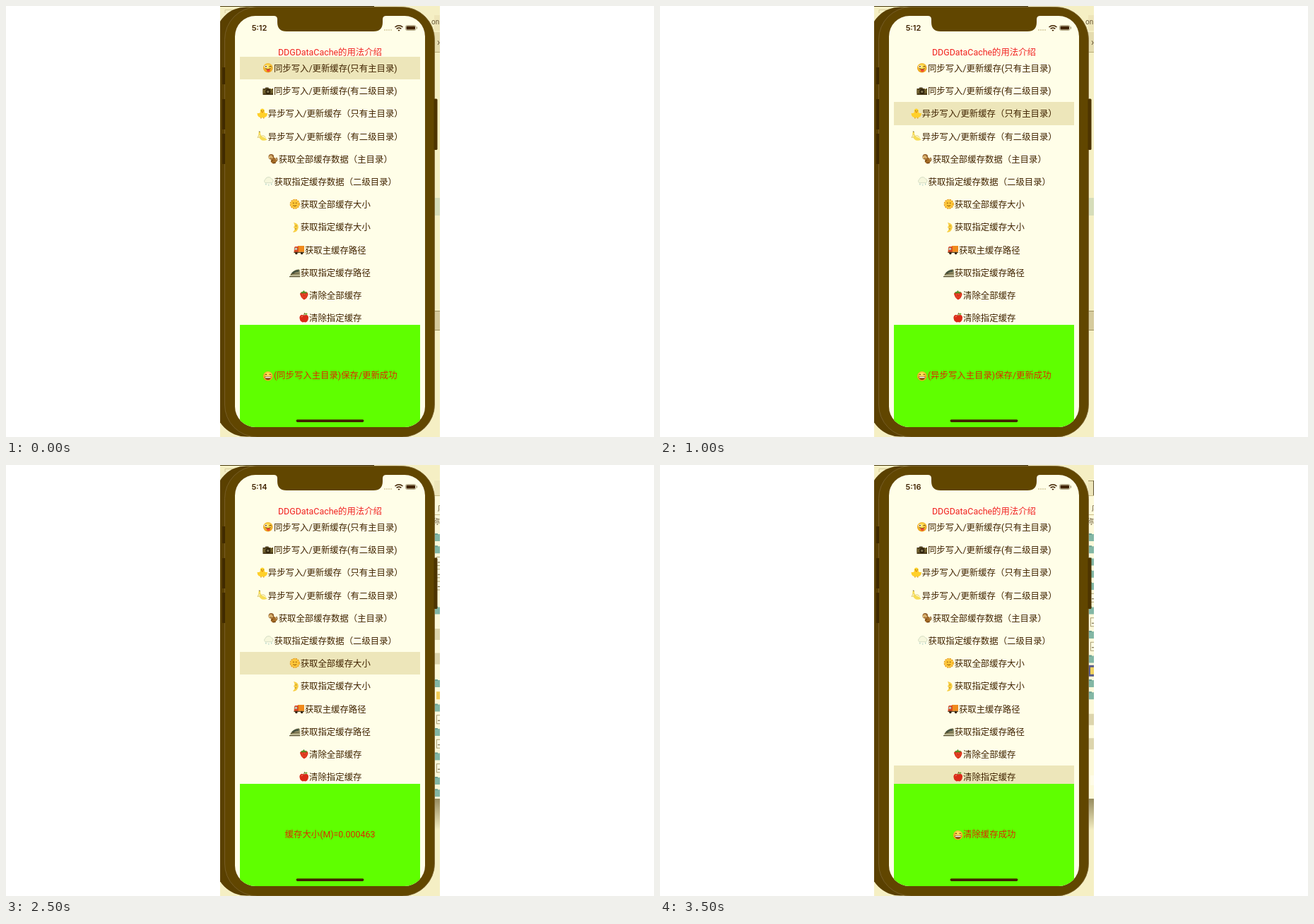
An HTML page for the animation above (4000 ms loop, 917 by 611 pixels).

```html
<!DOCTYPE html>
<html lang="zh-CN">
<head>
<meta charset="utf-8">
<style>
  html, body { margin: 0; width: 917px; height: 611px; overflow: hidden; background: #fff; }
  body { position: relative; font: 12.4px Roboto, "Noto Sans CJK SC", "Noto Sans CJK", sans-serif; color: #412400; }
  #device { position: absolute; left: 0; top: 0; }
  #screen { position: absolute; left: 324px; top: 14px; width: 269px; height: 583px;
    border-radius: 29px; overflow: hidden; background: #fffee8; }
  #screen > * { position: absolute; }
  #clock { left: 18px; top: 10px; width: 33px; text-align: center; font: 600 11px/15px Inter, sans-serif; }
  #title { left: 7px; width: 255px; top: 44px; line-height: 16px; text-align: center; color: #f12321; }
  #list { left: 7px; top: 58px; width: 255px; }
  .row, #panel { display: flex; align-items: center; justify-content: center; white-space: nowrap; }
  .row { height: 32.2px; }
  .row.on { background: #ede6ba; }
  #panel { left: 7px; top: 438px; width: 255px; height: 145px; background: #5fff00; color: #d92b00;
    line-height: 14.5px; text-align: center; }
  .path { letter-spacing: -.1px; }
  .icon { width: 15.5px; height: 15.5px; flex: none; }
</style>
</head>
<body>
<svg id="device" width="917" height="611">
  <defs>
    <radialGradient id="skin" cy=".4"><stop offset=".3" stop-color="#ffe45c"/><stop offset="1" stop-color="#eda51c"/></radialGradient>
    <linearGradient id="shade" x2="0" y2="1"><stop stop-color="#968b5f"/><stop offset="1" stop-color="#f5efc4"/></linearGradient>
    <clipPath id="strip"><path d="M303 0H614V611H303Z"/></clipPath>
    <g id="face"><circle cx="8" cy="8" r="7" fill="url(#skin)"/></g>
    <g id="grin"><path d="M3 8.5h10q-1 5-5 5t-5-5z" fill="#83400c"/><path d="M4 9h8v1.6H4z" fill="#fff"/></g>
    <symbol id="wink" viewBox="0 0 16 16"><use href="#face"/><circle cx="5" cy="6" r="2" fill="#fff"/><circle cx="5" cy="6" r="1" fill="#512b00"/><path d="M9.5 6.5q2-2 3.5 0M4 9q4 2 8 0" fill="none" stroke="#663500"/><path d="M6 10h5v2.5q-2.5 3-5 0z" fill="#ee4a35"/></symbol>
    <symbol id="smile" viewBox="0 0 16 16"><use href="#face"/><path d="M3.5 6.5q1.5-3 3 0M9.5 6.5q1.5-3 3 0" fill="none" stroke="#663500"/><use href="#grin"/></symbol>
    <symbol id="laugh" viewBox="0 0 16 16"><use href="#face"/><path d="M3 4l3 1.5L3 7M13 4l-3 1.5L13 7" fill="none" stroke="#663500"/><use href="#grin"/></symbol>
    <symbol id="camera" viewBox="0 0 16 16"><path d="M.5 4h3l1-1.5h4l1 1.500h6v9.500H.5z" fill="#4b3c1b"/><path d="M.5 6h15v5H.5z" fill="#70602e"/><circle cx="8" cy="8.8" r="3.700" fill="#2e210b"/><circle cx="8" cy="8.8" r="1.800" fill="#7c7250"/><path d="M12 4.700h2" stroke="#f7e9a0"/></symbol>
    <symbol id="chick" viewBox="0 0 16 16"><path d="M6 13v2M10 13v2" stroke="#db8d14" stroke-width="1.4"/><path d="M.5 7q3 1 4.500-1-1-5 3-5.500 4 .5 3 5.500 1.500 2 4.500 1 0 7-7.500 7T.5 7z" fill="#ffd02a"/><path d="M6.500 5h3L8 7z" fill="#e27a10"/><path d="M6.300 3.800h.8M9 3.800h.8" stroke="#412400"/></symbol>
    <symbol id="banana" viewBox="0 0 16 16"><path d="M3 1l2 1q0 5 4 7 4 1 6 4-6 3-10-1-4-4-2-11z" fill="#f6dc55"/><path d="M5 5Q2 6 1 10l3-1M6 8q4-3 7 2" fill="#fff5b5" stroke="#cab25a" stroke-width=".6"/><path d="M3 1l1.700.5" stroke="#634500"/></symbol>
    <symbol id="monkey" viewBox="0 0 16 16"><path d="M11 12q5-1 2-6" fill="none" stroke="#855419" stroke-width="1.4"/><ellipse cx="9" cy="10.500" rx="4" ry="4.500" fill="#a66d28"/><circle cx="5.500" cy="5" r="4" fill="#93602a"/><ellipse cx="5" cy="5.500" rx="2.800" ry="2.600" fill="#f1ca82"/><path d="M3.700 4.500h.8M6 4.500h.8M4 7h2M8 10l-3 2M8 14h4" stroke="#593000"/></symbol>
    <symbol id="snow" viewBox="0 0 16 16"><path d="M3 10a3 3 0 010-5 5 5 0 019-1 3.400 3.400 0 011 6z" fill="#f6f7dc" stroke="#c2cfb5" stroke-width=".7"/><path d="M4 11v2M8 12v2M12 11v2" stroke="#91bfb7" stroke-width="1.300" stroke-dasharray="1 .5"/></symbol>
    <symbol id="sun" viewBox="0 0 16 16"><circle cx="8" cy="8" r="6.300" fill="none" stroke="#eaa016" stroke-width="2" stroke-dasharray="2.500 .8"/><circle cx="8" cy="8" r="5.800" fill="#ffc638"/><path d="M5 6.500h2M9 6.500h2M5.500 10q2.500 2 5 0" fill="none" stroke="#804b00"/></symbol>
    <symbol id="moon" viewBox="0 0 16 16"><path d="M6 1q8 1 7 8-2 7-8 6 4-3 2.500-6L6 8l1.500-2Q8 3 6 1z" fill="#f8cf43"/><path d="M9 6h1.500M8 10q1 1 2 0" fill="none" stroke="#805000" stroke-width=".8"/></symbol>
    <symbol id="truck" viewBox="0 0 16 16"><path d="M6 2h9.500v9H6z" fill="#f08b1d"/><path d="M1 5l1-2h5v9H.5z" fill="#d64625"/><path d="M2 5h3v3H1.500z" fill="#b7d6c4"/><path d="M.5 11h15v1.500H.5z" fill="#5c4b28"/><circle cx="4" cy="13" r="1.800" fill="#33240e"/><circle cx="12" cy="13" r="1.800" fill="#33240e"/></symbol>
    <symbol id="rail" viewBox="0 0 16 16"><path d="M1 13Q4 4 14 3l1.500 2v8z" fill="#a5a078"/><path d="M3 9q4-5 11-5v3q-5 0-9 3z" fill="#44513d"/><path d="M2 11q5-2 13-2M0 14h16" fill="none" stroke="#514a2a" stroke-width="1.200"/></symbol>
    <symbol id="strawberry" viewBox="0 0 16 16"><path d="M2 6q2-4 6-2 5-2 6 3-1 6-6 8-5-3-6-9z" fill="#dc321d"/><path d="M3 4l3-1 2-2 1 2 4 1-3 2-2-1-3 1z" fill="#519327"/><path d="M5 8h.8M8 7h.8M11 8h.8M6 11h.8M9 11h.8" stroke="#f7bd58"/></symbol>
    <symbol id="apple" viewBox="0 0 16 16"><path d="M8 5q5-3 6.500 2 0 7-4.500 8l-2-.5-2 .5Q1 13 1.500 7 3 2 8 5z" fill="#da2b18"/><path d="M8 5q0-2 1-4" fill="none" stroke="#634000"/><path d="M9 3q1-2 4-1-1 3-4 1z" fill="#62a42b"/><path d="M4 7q1-1 2-1" stroke="#f5a07a" fill="none"/></symbol>
  </defs>
  <g clip-path="url(#strip)">
    <path d="M303 0H614V611H303Z" fill="#f5efc4"/>
    <path d="M310 10V5.500H340" fill="none" stroke="#d4ca9a"/>
    <g id="backdrop"></g>
    <rect x="296" y="1.500" width="300" height="609" rx="44" fill="#5a4000"/>
    <rect x="309.500" y="1.500" width="297" height="609.500" rx="46" fill="#614600" stroke="#7b6430" stroke-width=".8"/>
    <path d="M308 87V111M308 132V175M308 181V224" stroke="#402a00" stroke-width="4"/>
    <rect x="605.500" y="131.500" width="5" height="72.500" rx="1.500" fill="#4d3400"/>
  </g>
</svg>
<div id="screen">
  <div id="clock"></div>
  <div id="title">DDGDataCache的用法介绍</div>
  <div id="list"></div>
  <div id="panel"></div>
  <svg width="269" height="583" style="left:0;top:0">
    <path d="M55 0q5 0 5 5v4q0 13 13 13H196q13 0 13-13V5q0-5 5-5z" fill="#614600"/>
    <g transform="translate(0 1)">
      <path d="M211 19H222" stroke="#d6cba0" stroke-width="1.600" stroke-dasharray="2 1"/>
      <g fill="none" stroke="#412400" stroke-width="1.600"><path d="M226.500 15q5.500-4.500 11 0M228.700 17.300q3.300-2.600 6.600 0"/><path d="M231 19l1 .8 1-.8"/></g>
      <rect x="241.500" y="12.500" width="14.500" height="7" rx="2" fill="#fffee8" stroke="#a39772" stroke-width=".8"/>
      <rect x="242.500" y="13.500" width="12.500" height="5" rx="1" fill="#412400"/>
      <path d="M257.500 14.500v3" stroke="#a39772"/>
      <rect x="86.500" y="571.300" width="96" height="3.600" rx="1.800" fill="#412400"/>
    </g>
  </svg>
</div>
<script>
const $ = id => document.getElementById(id);
const label = (icon, text) => `<svg class="icon"><use href="#${icon}"/></svg><span>${text}</span>`;
const rect = (x, y, w, h, fill) => `<rect x="${x}" y="${y}" width="${w}" height="${h}" fill="${fill}"/>`;
const note = (x, y, s, size = 10) => `<text x="${x}" y="${y}" font-size="${size}" fill="#675638">${s}</text>`;

const items = [
  ['wink', '同步写入/更新缓存(只有主目录)'], ['camera', '同步写入/更新缓存(有二级目录)'],
  ['chick', '异步写入/更新缓存（只有主目录）'], ['banana', '异步写入/更新缓存（有二级目录）'],
  ['monkey', '获取全部缓存数据（主目录）'], ['snow', '获取指定缓存数据（二级目录）'],
  ['sun', '获取全部缓存大小'], ['moon', '获取指定缓存大小'],
  ['truck', '获取主缓存路径'], ['rail', '获取指定缓存路径'],
  ['strawberry', '清除全部缓存'], ['apple', '清除指定缓存']
];
$('list').innerHTML = items.map(([icon, text]) => `<div class="row">${label(icon, text)}</div>`).join('');
const rows = [...document.querySelectorAll('.row')];

// One letter per line of the file window: folder, document, yellow note, band, selection.
const symbols = {
  f: y => rect(607, y - 4, 7, 10, '#83b7a5') + rect(607, y - 5, 4, 2, '#6a9f91'),
  d: y => rect(609.5, y - 6, 6, 12, '#fffce2" stroke="#aaa077') + rect(611, y + 1, 3, 1, '#655737'),
  y: y => rect(609, y - 5, 5, 11, '#f3cd56'),
  b: y => rect(606, y - 8, 8, 16, '#ddd5ad'),
  s: y => rect(606, y - 8, 8, 16, '#595b8b') + rect(609, y - 5, 5, 10, '#f1d35f')
};
const topEdge = rect(303, 0, 218, 1, '#4a3b12');
const finder = lines => topEdge + rect(606, 22, 8, 451, '#fdf9da') + rect(606, 22, 8, 21, '#eee6bb')
  + rect(606, 43, 8, 1, '#c9bd8a') + rect(606, 70, 8, 1, '#c9bd8a')
  + note(611, 65, '店') + note(604, 84, '称')
  + [...lines].map((c, i) => symbols[c]?.(102 + i * 17.25) ?? '').join('')
  + rect(606, 473, 8, 45, 'url(#shade)');

const backdrops = {
  editor: topEdge + rect(606, 13, 8, 22, '#eee5b9') + rect(606, 37, 8, 29, '#e5dcaf') + rect(606, 65, 8, 1, '#b9ac7a')
    + note(602, 26, 'on') + note(610, 56, '›', 14) + rect(606, 272, 8, 25, '#d6ddba')
    + rect(606, 432, 8, 28, '#d6cb9d') + rect(606, 432, 8, 1, '#9e9162') + rect(606, 459, 8, 1, '#9e9162'),
  files: finder('ffddd f bbfyfdfdfdffff'),
  selected: finder('ffddd f b b fyfdfdfdff'),
  project: rect(608, 3, 6, 59, '#fffbe0') + rect(606, 62, 8, 74, '#d9d0a6') + rect(606, 136, 8, 1, '#b3a673')
    + note(608, 120, '目') + note(609, 153, '1') + note(610, 184, 'u') + note(607, 214, 'D')
    + rect(606, 163, 8, 1, '#c5ba8a') + rect(606, 223, 8, 1, '#b3a673')
    + rect(606, 431, 8, 24, '#d6ddba') + rect(580, 590, 34, 1, '#b3a673') + note(579, 609, '▯▯') + note(607, 609, '∠'),
  cleared: finder('fffffdfdfdfsff b b') + rect(606, 22, 8, 1, '#9f9263') + rect(613, 22, 1, 21, '#5f522c')
    + rect(609, 440, 5, 14, '#fffce8')
};

const path = `缓存路径=/Users/demouser/Library/<br>Developer/CoreSimulator/Devices/<br>
05927DAB-37AB-47F5-A1FB-1682113A713E/<br>data/Containers/Data/Application/E9BE1BFF-<br>
E10B-4BF4-A771-825D9E98B7AF/Library/<br>appCache`;
const scenes = [
  [0, '5:12', 'editor', label('smile', '(同步写入主目录)保存/更新成功')],
  [1, '5:12', 'editor', label('laugh', '(同步二级目录)保存/更新成功')],
  [2, '5:12', 'editor', label('smile', '(异步写入主目录)保存/更新成功')],
  [3, '5:13', 'files', label('laugh', '(异步写入二级目录)保存/更新成功')],
  [4, '5:13', 'files', label('smile', '获取全部缓存数据成功')],
  [6, '5:14', 'selected', '缓存大小(M)=0.000463'],
  [8, '5:18', 'project', `<span class="path">${path}</span>`],
  [11, '5:16', 'cleared', label('smile', '清除缓存成功')]
];

let shown = -1;
function draw() {
  const index = Math.floor(performance.now() % 4000 / 500);
  if (index !== shown) {
    shown = index;
    const [active, time, backdrop, message] = scenes[index];
    rows.forEach((row, i) => row.classList.toggle('on', i === active));
    $('clock').textContent = time;
    $('backdrop').innerHTML = backdrops[backdrop];
    $('panel').innerHTML = message;
  }
  requestAnimationFrame(draw);
}
draw();
</script>
</body>
</html>
```
